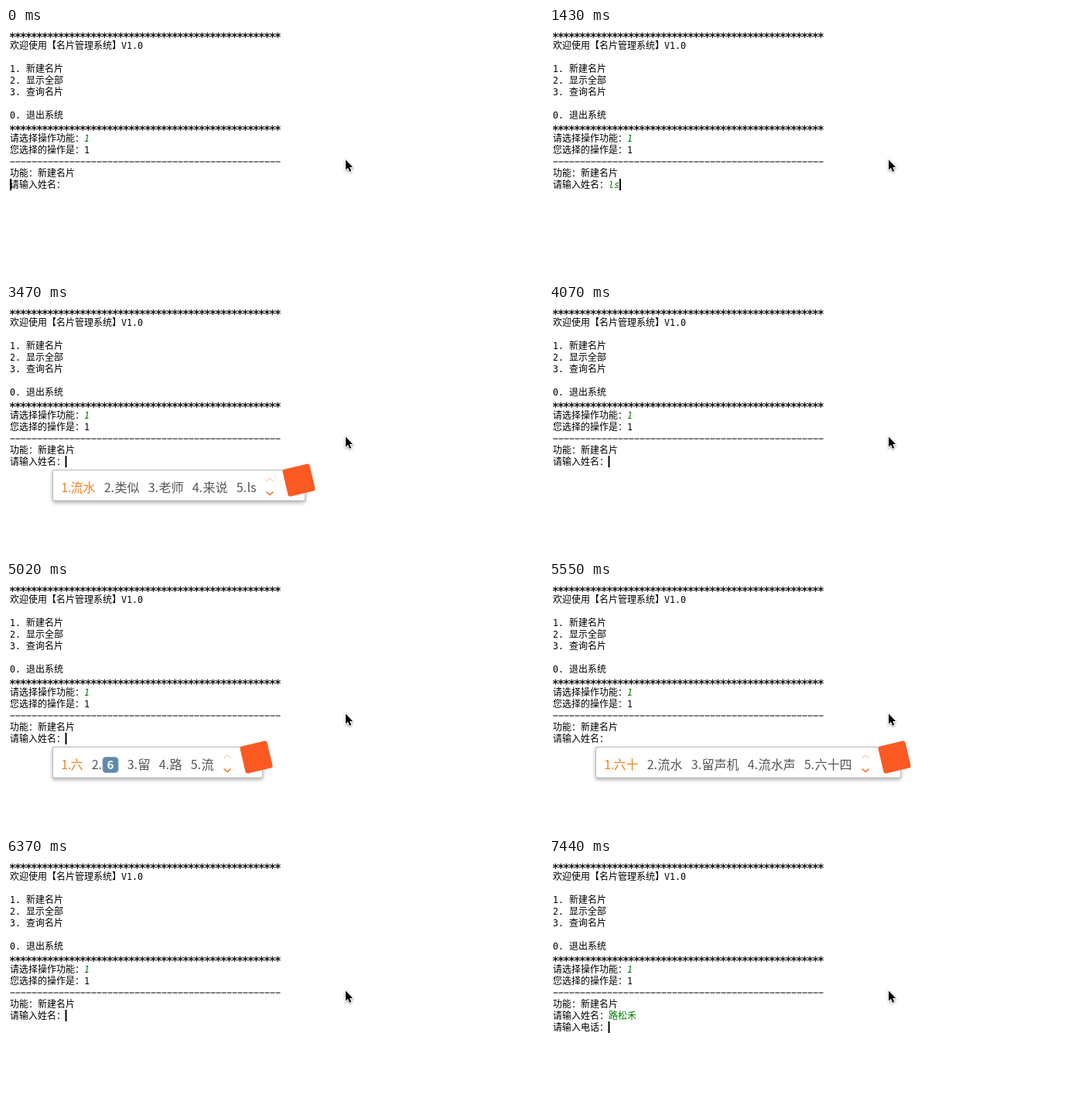
Write an HTML page with a canvas that moves like this. It is 694 px wide and 322 px high and loops after 8 s.

```html
<!DOCTYPE html>
<html lang="zh-CN">
<head>
<meta charset="utf-8">
<title>名片管理系统</title>
<style>
html, body { margin: 0; width: 100%; height: 100%; overflow: hidden; background: #fff; }
canvas { display: block; }
</style>
</head>
<body>
<canvas id="stage" width="694" height="322"></canvas>
<script>
const ctx = document.getElementById('stage').getContext('2d');
const LOOP = 8000, LEFT = 5, ROW = 15;
const CJK = '"Noto Sans CJK SC", "Noto Sans CJK", sans-serif';
const MONO = '"DejaVu Sans Mono", monospace';
const BLACK = '#000', GREEN = '#008000', ORANGE = '#f5801e', GREY = '#555';
const NAME = '路松禾';
const KEYCAP = '⑥';

const lines = [
  [1, '欢迎使用【名片管理系统】V1.0'],
  [3, '1. 新建名片'],
  [4, '2. 显示全部'],
  [5, '3. 查询名片'],
  [7, '0. 退出系统'],
  [9, '请选择操作功能：'],
  [10, '您选择的操作是：1'],
  [12, '功能：新建名片'],
  [13, '请输入姓名：']
];

// Timelines: [start in ms, value]
const typed = [
  [0, ''], [1250, 'l'], [1430, 'ls'], [1610, 'lsh'],
  [2150, 'ls'], [2510, 'l'], [2690, ''], [6430, NAME]
];
const caret = [
  [0, 5], [60, 0], [530, 5], [1010, 0],
  [1250, 84], [1430, 91], [1610, 98], [2150, 91], [2510, 84], [2690, 76.5],
  [3530, 0], [4010, 76.5], [4540, 0], [5020, 76.5], [5550, 0], [6020, 76.5],
  [6430, 112.5], [7030, 0], [7260, 5], [7440, 76.5]
];
const popup = [
  [0, ''],
  [2930, '了 来 里 老 拉'],
  [3170, '流水 类似 老师 来说 ls'],
  [3230, '流水 老实 老师 历史 lsh'],
  [3470, '流水 类似 老师 来说 ls'],
  [3650, '了 来 里 老 拉'],
  [4070, ''],
  [4250, '了 来 里 老 拉'],
  [4420, '里 力 理 离 立'],
  [4600, '六 ⑥ 留 路 流'],
  [5250, '六十 流水 留声机 流水声 六十四'],
  [5610, '流沙 六十岁 流水声 六十四 留声机'],
  [5720, '路松 柳梢 六少 六 ⑥'],
  [5900, NAME + ' 六十回 柳树花 流水号 留声盒'],
  [6020, NAME + ' 柳树花 流水号 六十回 留声'],
  [6370, '']
];

function at(track, t) {
  let value = track[0][1];
  for (const [start, v] of track) if (t >= start) value = v;
  return value;
}

// Console text: 7px cells for ASCII, 12px cells for Chinese
function print(text, x, row, color = BLACK, style = '') {
  ctx.fillStyle = color;
  const y = row * ROW + 12;
  for (const ch of text) {
    const ascii = ch < '\x7f';
    ctx.font = ascii ? `${style} 11.6px ${MONO}` : `12px ${CJK}`;
    ctx.fillText(ch, x, y);
    x += ascii ? 7 : 12;
  }
}

function starLine(row) {
  ctx.fillStyle = ctx.strokeStyle = BLACK;
  ctx.lineWidth = 0.3;
  ctx.font = `14.5px ${MONO}`;
  for (let i = 0; i < 50; i++) {
    const x = LEFT - 0.9 + i * 7, y = row * ROW + 15.6;
    ctx.fillText('*', x, y);
    ctx.strokeText('*', x, y);
  }
}

function drawConsole(t) {
  starLine(0);
  starLine(8);
  for (const [row, text] of lines) print(text, LEFT, row);
  print('1', 101, 9, GREEN, 'italic');
  ctx.fillStyle = BLACK;
  for (let i = 0; i < 50; i++) ctx.fillRect(LEFT + 0.5 + i * 7, 172.5, 6, 1);
  print(at(typed, t), 77, 13, GREEN, 'italic');
  if (t >= 7440) print('请输入电话：', LEFT, 14);
  const x = at(caret, t);
  ctx.fillStyle = BLACK;
  if (x) ctx.fillRect(x, (t >= 7260 ? 14 : 13) * ROW, 2, ROW);
}

function drawPointer() {
  ctx.save();
  ctx.translate(439, 170.5);
  ctx.scale(0.87, 0.87);
  ctx.beginPath();
  [[0, 0], [0, 15], [3.4, 11.9], [5.8, 17.4], [8.2, 16.4], [5.9, 11], [10.4, 11]]
    .forEach(p => ctx.lineTo(...p));
  ctx.closePath();
  ctx.shadowColor = 'rgba(0,0,0,.4)';
  ctx.shadowBlur = 3;
  ctx.shadowOffsetY = 1;
  ctx.strokeStyle = '#fff';
  ctx.lineWidth = 2;
  ctx.stroke();
  ctx.shadowColor = 'transparent';
  ctx.fillStyle = BLACK;
  ctx.fill();
  ctx.restore();
}

function roundBox(x, y, w, h, r) {
  ctx.beginPath();
  ctx.roundRect(x, y, w, h, r);
}

function drawKeycap(x) {
  roundBox(x, 226.5, 20, 20, 4);
  ctx.fillStyle = '#6189ab';
  ctx.fill();
  ctx.strokeStyle = '#8aa5bb';
  ctx.lineWidth = 1;
  ctx.stroke();
  ctx.fillStyle = '#fff';
  ctx.font = `bold 15px ${CJK}`;
  ctx.textAlign = 'center';
  ctx.fillText('6', x + 10, 241.5);
  ctx.textAlign = 'left';
}

function chevron(x, y, dir, color) {
  ctx.beginPath();
  ctx.moveTo(x - 4.5, y - 2 * dir);
  ctx.lineTo(x, y + 2 * dir);
  ctx.lineTo(x + 4.5, y - 2 * dir);
  ctx.strokeStyle = color;
  ctx.lineWidth = 1.6;
  ctx.stroke();
}

function layout(words) {
  ctx.font = `16px ${CJK}`;
  let x = 72;
  const items = words.map((word, i) => {
    const start = x + (i ? 13 : 11);
    const end = start + (word === KEYCAP ? 21 : ctx.measureText(word).width);
    x = end + 12;
    return { word, start, end };
  });
  return { items, right: Math.round(x - 12 + 64) };
}

function drawPopup(text) {
  if (!text) return;
  const { items, right } = layout(text.split(' '));
  ctx.save();
  ctx.shadowColor = 'rgba(0,0,0,.35)';
  ctx.shadowBlur = 5;
  ctx.shadowOffsetY = 2;
  roundBox(60, 213, right - 60, 40.5, 2);
  ctx.fillStyle = '#bdbdbd';
  ctx.fill();
  ctx.restore();
  roundBox(61, 214, right - 62, 38.5, 1.5);
  ctx.fillStyle = '#fff';
  ctx.fill();

  items.forEach(({ word, start }, i) => {
    ctx.font = `16px ${CJK}`;
    ctx.fillStyle = i ? GREY : ORANGE;
    ctx.textAlign = 'right';
    ctx.fillText(i + 1 + '.', start + (i ? 0 : 1.5), 242);
    ctx.textAlign = 'left';
    if (word === KEYCAP) drawKeycap(start + 1);
    else ctx.fillText(word, start + 0.5, 242);
  });

  chevron(right - 46, 226, -1, '#fcd3bd');
  chevron(right - 46, 243.5, 1, '#f5701e');

  ctx.save();
  ctx.translate(right - 8.5, 226.5);
  ctx.rotate(-0.23);
  roundBox(-18, -18, 36, 36, 3);
  ctx.fillStyle = '#fa5a22';
  ctx.fill();
  ctx.restore();
}

const begin = performance.now();
function draw() {
  const t = (performance.now() - begin) % LOOP;
  ctx.fillStyle = '#fff';
  ctx.fillRect(0, 0, 694, 322);
  drawConsole(t);
  drawPopup(at(popup, t));
  drawPointer();
  requestAnimationFrame(draw);
}
draw();
</script>
</body>
</html>
```
